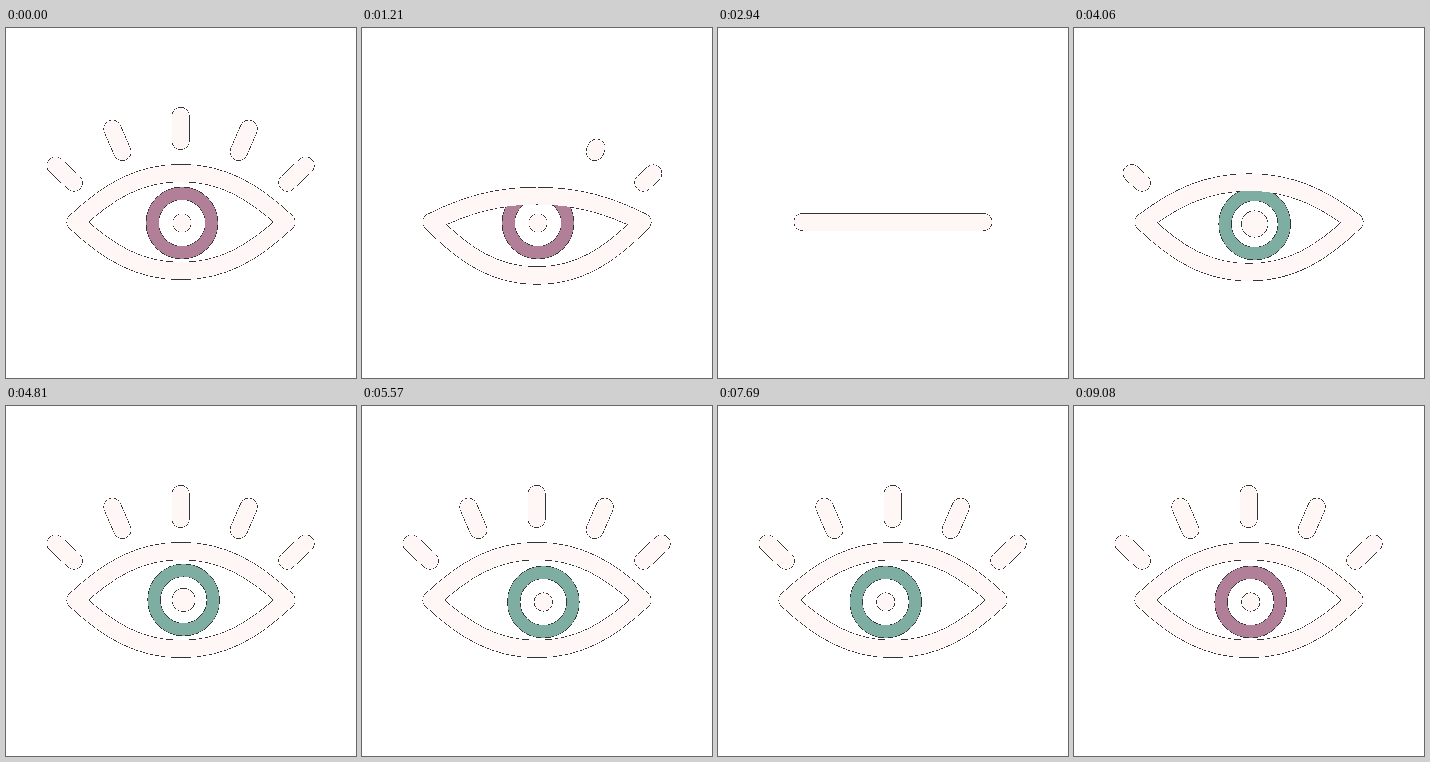
Recreate the animation shown at these times as an HTML page. Size 350x350 px, loop 9110 ms.

```html
<!DOCTYPE html>
<html lang="en">
<head>
<meta charset="utf-8">
<title>Eye</title>
<style>
html, body { margin: 0; width: 100%; height: 100%; overflow: hidden; background: #fff; }
svg { display: block; width: 100vw; height: 100vh; fill: none; stroke-linecap: round; stroke-linejoin: round; shape-rendering: crispEdges; }
</style>
</head>
<body>
<svg viewBox="0 0 350 350">
  <clipPath id="opening"><path id="hole"/></clipPath>
  <g id="edges" stroke="#333"><g clip-path="url(#opening)"></g></g>
  <g id="fills"><g clip-path="url(#opening)"></g></g>
</svg>
<script>
const LOOP = 9110;
const SKIN = '#fff6f6', PINK = '#b17f97', TEAL = '#7eada2';
const CX = 175, CY = 194, HALF = 105.5, LID = 49;

const smooth = p => p * p * (3 - 2 * p);
const glide = p => p < .5 ? 4 * p ** 3 : 1 - 4 * (1 - p) ** 3;
const easeIn = p => p * p;
const easeOut = p => 1 - (1 - p) ** 2.5;
const backOut = p => 1 + 2.7 * (p - 1) ** 3 + 1.7 * (p - 1) ** 2;
const ramp = (t, start, end) => Math.max(0, Math.min(1, (t - start) / (end - start)));

// Every shape is a stroke with a slightly wider dark copy in the layer below.
function shape(tag, clipped) {
  const [edge, fill] = ['edges', 'fills'].map(id => {
    const layer = document.getElementById(id);
    const el = document.createElementNS('http://www.w3.org/2000/svg', tag);
    return (clipped ? layer.firstElementChild : layer).appendChild(el);
  });
  return (visible, color, width, attrs) => {
    for (const el of [edge, fill]) {
      el.setAttribute('display', visible ? 'inline' : 'none');
      for (const name in attrs) el.setAttribute(name, attrs[name]);
    }
    edge.setAttribute('stroke-width', width + 1.1);
    fill.setAttribute('stroke', color);
    fill.setAttribute('stroke-width', width);
  };
}

const hole = document.getElementById('hole');
const iris = shape('circle', true), pupil = shape('circle', true);
const eye = shape('path');

// Lashes fan out evenly along an ellipse above the eye.
const lashes = [-2, -1, 0, 1, 2].map(k => {
  const sin = Math.sin(k * .41), cos = Math.cos(k * .41);
  return { x: CX - .4 + 146 * sin, y: 244 - 131 * cos, sin, cos, draw: shape('line') };
});

const rings = [
  { x: 174, y: 129, size: 113, color: '#7d70a8' },
  { x: 224, y: 113, size: 71, color: '#b9bb86' },
  { x: 93.5, y: 135, size: 71, color: '#7fa9a6' },
  { x: 172, y: 277, size: 71, color: '#b77f96' }
].map(ring => ({ ...ring, draw: shape('circle') }));

function lidPath(top, bottom, scale) {
  const x = d => CX + d * scale;
  const lid = (h, side) => {
    const near = CY + h * .64, far = CY + h;
    return `C${x(-72 * side)} ${near} ${x(-41 * side)} ${far} ${CX} ${far}` +
      `S${x(72 * side)} ${near} ${x(HALF * side)} ${CY}`;
  };
  return `M${x(-HALF)} ${CY}${lid(-top, 1)}${lid(bottom, -1)}Z`;
}

function draw(t) {
  const step = (start, end, ease = glide) => ease(ramp(t, start, end));
  const second = t > 2000 ? 1 : 0;

  // Lids: close, come back with a spring, then one blink of the upper lid.
  const blink = step(8000, 8400, smooth) - step(8450, 8800, smooth);
  const top = LID * (1 - step(1000, 1440, smooth) + step(3450, 4300, smooth) - 1.94 * blink);
  const bottom = LID * (backOut(1 - ramp(t, 1000, 1440)) + step(3450, 4160, backOut));
  const width = 1 - step(1440, 1660, easeIn) + step(2730, 3120, easeOut);
  const d = lidPath(top, bottom, width);
  hole.setAttribute('d', d);
  eye(width > .001, SKIN, 17, { d });

  // Gaze: a small circle, then right, left, and back to the middle.
  const turn = 2 * Math.PI * step(30, 840, smooth);
  const cx = 176 - 1.7 * (1 - Math.cos(turn)) + 4.7 * second
    - 7.5 * step(4390, 5290) + 35.5 * step(5320, 5970) - 67 * step(6130, 6680)
    - 4.5 * step(6910, 7340) + 39.5 * step(7570, 7840, easeOut);
  const cy = 195 - 4 * Math.sin(turn) + second
    - 5 * step(4390, 5290) + 5 * step(5320, 5560)
    - 2 * step(6910, 7340) + 2 * step(7570, 7690);
  const r = 9 + 4 * second - 4 * step(4390, 5290);
  const shown = t < 1440 || t > 3450;
  iris(shown, second && t < 8430 ? TEAL : PINK, 12.2, { cx, cy, r: 29.6 });
  pupil(shown, SKIN, r, { cx, cy, r: r / 2 });

  lashes.forEach(({ x, y, sin, cos, draw }, i) => {
    const wave = (start, gap) => ramp(t, start + gap * i, start + gap * i + 110);
    const length = 25 * (1 - wave(1000, 40) + wave(4000, 62) - wave(8000, 35) + wave(8620, 42));
    draw(length > .01, SKIN, 17, { x1: x, y1: y, x2: x + length * sin, y2: y - length * cos });
  });

  rings.forEach(({ x, y, size, color, draw }, i) => {
    const p = ramp(t, 1805 + 20 * i, 2570);
    const outer = size * p ** 2.4;
    const band = Math.min(outer, 3.8, 12 * (1 - p));
    draw(p > 0 && p < 1, color, band, { cx: x, cy: y, r: outer - band / 2 });
  });
}

function tick() {
  draw(performance.now() % LOOP);
  requestAnimationFrame(tick);
}
tick();
</script>
</body>
</html>
```
